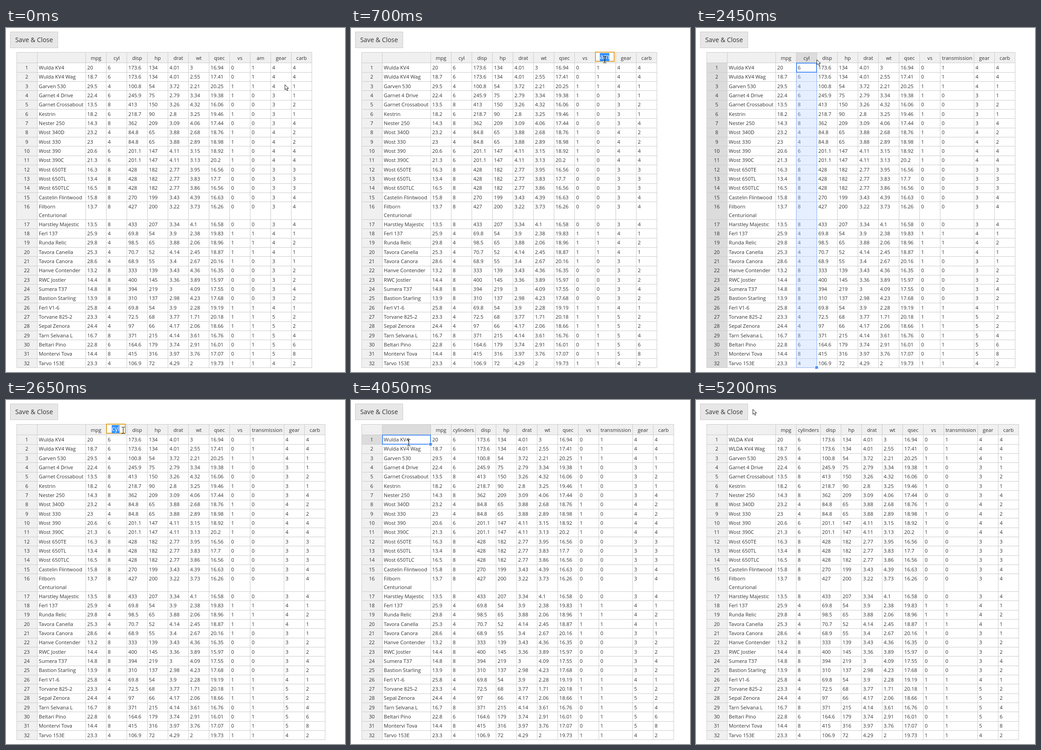
Recreate the animation shown at these times as an HTML page with a canvas. Size 742 by 755 pixels, loop 5.25 s.

```html
<!DOCTYPE html>
<html lang="en">
<head>
<meta charset="utf-8">
<title>Editable table</title>
<style>
html, body { margin: 0; width: 100%; height: 100%; overflow: hidden; background: #fff; }
canvas { display: block; }
</style>
</head>
<body>
<canvas id="stage" width="742" height="755"></canvas>
<script>
const ctx = document.getElementById('stage').getContext('2d');
const LOOP = 5250, STEP = 50;
const FONT = '"Open Sans", "Noto Sans", sans-serif';
const SMALL = '11.12px ' + FONT, LARGE = '13.9px ' + FONT;
const INK = '#333', LINE = '#ccc', HEAD = '#f0f0f0', HEAD_ON = '#dcdcdc', BLUE = '#5292f7';

const heads = ['', 'mpg', 'cyl', 'disp', 'hp', 'drat', 'wt', 'qsec', 'vs', 'am', 'gear', 'carb'];

// Car name, then its cylinders and carburettors
const cars = `Wulda KV4|64
Wulda KV4 Wag|64
Garven 530|41
Garnet 4 Drive|61
Garnet Crossabout|82
Kestrin|61
Nester 250|84
Wost 340D|42
Wost 330|42
Wost 390|64
Wost 390C|64
Wost 650TE|83
Wost 650TL|83
Wost 650TLC|83
Castelin Flintwood|84
Filborn/Centurional|84
Harstley Majestic|84
Ferl 137|41
Runda Relic|42
Tavora Canella|41
Tavora Canora|41
Hanve Contender|82
RWC Jostler|82
Sumera T37|84
Bastion Starling|82
Ferl V1-6|41
Torvane 825-2|42
Sepal Zenora|42
Tarn Selvana L|84
Beltari Pino|66
Montervi Tova|88
Tarvo 153E|42`.split('\n');

// Random source in -1..1, seeded by a word
function noise(word) {
  let seed = 7;
  for (const ch of word) seed = (seed * 31 + ch.charCodeAt(0)) % 233280;
  return () => (seed = (seed * 9301 + 49297) % 233280) / 116640 - 1;
}

const within = (t, a, b) => t >= a && t < b;
const fixed = (value, digits) => +value.toFixed(digits);

function carRow(line, r) {
  const [name, build] = line.split('|');
  const [cyl, carb] = [...build].map(Number);
  const manual = r < 3 || within(r, 17, 20) || r > 24 ? 1 : 0;
  const gear = within(r, 26, 31) ? 5 : manual || within(r, 7, 11) ? 4 : 3;
  const straight = cyl === 4 || cyl === 6 && !manual ? 1 : 0;
  // Models of one make and engine share the engine figures.
  const family = noise(name.split(/[ /]/)[0] + build + manual), own = noise(name);
  const mpg = fixed(38 - 2.9 * cyl + own() * 16 / cyl, 1);
  const disp = fixed(5.6 * cyl * cyl * (1 + 0.25 * family()), cyl > 6 ? 0 : 1);
  const hp = fixed(10 + 10 * cyl + 0.46 * carb * cyl * cyl + 12 * family(), 0);
  const drat = fixed((gear > 3 ? 3.98 : 3.1) + 0.35 * family(), 2);
  const wt = fixed(1.4 + 0.34 * cyl - 0.7 * manual + 0.4 * own(), 2);
  const qsec = fixed((straight ? 19.4 : 16.8) + own(), 2);
  return [name, mpg, cyl, disp, hp, drat, wt, qsec, straight, manual, gear, carb];
}
const rows = cars.map(carRow);

// Top of row r (0-based); the sixteenth row is two lines tall.
const rowTop = r => 76.4 + 20.33 * r + (r > 15 ? 18.4 : 0);
const rowY = r => Math.round(rowTop(r));

// Pointer stops: time, x, y
const path = [
  [0, 610, 124], [350, 570, 26], [650, 555, 69], [1150, 555, 69], [1600, 572, 132],
  [1850, 470, 225], [2200, 283, 75], [2550, 256, 66], [3050, 256, 66], [3350, 430, 222],
  [3400, 218, 247], [3900, 126, 93], [4950, 126, 93], [5050, 226, 195], [5200, 124, 20]
];

function pointer(t) {
  let i = 0;
  while (i < path.length - 2 && path[i + 1][0] <= t) i++;
  const [t0, x0, y0] = path[i], [t1, x1, y1] = path[i + 1];
  const k = Math.min(1, (t - t0) / (t1 - t0));
  return [Math.round(x0 + (x1 - x0) * k), Math.round(y0 + (y1 - y0) * k)];
}

function typed(t, from, to, before, word) {
  if (t < from) return before;
  return word.slice(0, Math.ceil(word.length * Math.min(1, (t - from + STEP) / (to - from))));
}

// The make is retyped in front of the rest of the name.
const retype = (t, from, tail) => typed(t, from, from + 150, 'Wulda', 'WLDA') + tail;

function stateAt(t) {
  const s = { names: [...heads], cells: {}, sel: null, head: null, edit: null };
  if (t >= 1250) s.names[9] = 'transmission';
  if (t >= 3350) s.names[2] = 'cylinders';
  if (t >= 4700) s.cells[0] = 'WLDA KV4';
  if (t >= 5000) s.cells[1] = 'WLDA KV4 Wag';

  if (within(t, 600, 650)) s.sel = { col: 9, all: true };
  if (within(t, 2450, 2550)) s.sel = { col: 2, all: true };
  if (within(t, 3350, 3950)) s.sel = { col: 6, row: 7 };
  if (within(t, 3950, 4200)) s.sel = { col: 0, row: 0 };

  if (within(t, 650, 1250)) s.head = { col: 9, text: typed(t, 750, 1200, 'am', 'transmission'), marked: t < 750 };
  if (within(t, 2550, 3350)) s.head = { col: 2, text: typed(t, 2800, 3100, 'cyl', 'cylinders'), marked: t < 2800 };

  if (within(t, 4200, 4750)) s.edit = { row: 0, text: retype(t, 4450, ' KV4') };
  if (within(t, 4750, 5000)) s.edit = { row: 1, text: retype(t, 4850, ' KV4 Wag') };

  s.beam = within(t, 650, 1250) || within(t, 2550, 3100) || within(t, 3950, 5000);
  return s;
}

function columns(names) {
  const xs = [68, 174];
  for (let c = 1; c < 12; c++) {
    const w = names[c] === 'transmission' ? 74 : names[c] === 'cylinders' ? 53 : 45;
    xs.push(xs[c] + w);
  }
  return xs;
}

function box(x, y, w, h, color) {
  ctx.fillStyle = color;
  ctx.fillRect(x, y, w, h);
}

function label(text, x, y, align = 'left', color = INK, font = SMALL) {
  ctx.font = font;
  ctx.textAlign = align;
  ctx.fillStyle = color;
  ctx.fillText(text, x, y);
}

function frame(l, t, r, b, width, color) {
  ctx.strokeStyle = color;
  ctx.lineWidth = width;
  ctx.strokeRect(l + width / 2, t + width / 2, r - l + 1 - width, b - t + 1 - width);
}

function drawTable(s, xs) {
  const right = xs[12], bottom = rowY(32);
  const active = s.sel || (s.edit && { col: 0, row: s.edit.row });
  box(23, 53, right - 23, 23, HEAD);
  box(23, 76, 45, bottom - 76, HEAD);
  if (active) {
    const top = rowY(active.all ? 0 : active.row);
    box(xs[active.col], 53, xs[active.col + 1] - xs[active.col], 23, HEAD_ON);
    box(23, top, 45, rowY(active.all ? 32 : active.row + 1) - top, HEAD_ON);
  }
  for (const x of [23, ...xs]) box(x, 53, 1, bottom - 52, LINE);
  box(23, 53, right - 22, 1, LINE);
  for (let r = 0; r <= 32; r++) box(23, rowY(r), right - 22, 1, LINE);

  s.names.forEach((name, c) => label(name, (xs[c] + xs[c + 1] + 1) / 2, 70, 'center'));
  rows.forEach((row, r) => {
    const y = Math.round(rowTop(r) + 14.5);
    label(r + 1, 45.5, y, 'center');
    row.forEach((value, c) => {
      const text = String(c === 0 && s.cells[r] || value);
      text.split('/').forEach((part, i) => label(part, xs[c] + 3.8, y + 19 * i));
    });
  });
}

function drawSelection({ col, row, all }, xs) {
  const l = xs[col], r = xs[col + 1];
  const top = rowY(all ? 0 : row), bottom = rowY(all ? 32 : row + 1);
  if (all) {
    box(l, rowY(1), r - l, bottom - rowY(1), 'rgba(181,209,255,.34)');
    frame(l, top, r, bottom, 1, '#89aff9');
  }
  frame(l, top, r, all ? rowY(1) : bottom, 2, BLUE);
  box(r - 4, bottom - 4, 7, 7, '#fff');
  box(r - 3, bottom - 3, 6, 6, BLUE);
}

function drawHeadEditor({ col, text, marked }, xs) {
  const x = xs[col], mid = x + 21;
  box(x, 52, 43, 22, '#fff');
  frame(x, 52, x + 42, 73, 2, '#e2a433');
  ctx.font = LARGE;
  const w = ctx.measureText(text).width;
  const left = w > 35 ? x + 38 - w : mid - w / 2;
  ctx.save();
  ctx.beginPath();
  ctx.rect(x + 3, 54, 37, 19);
  ctx.clip();
  if (marked) box(left, 55, w, 18, '#3390ff');
  else box(Math.round(left + w), 57, 1, 14, '#000');
  label(text, left, 68, 'left', marked ? '#fff' : INK, LARGE);
  ctx.restore();
}

function drawCellEditor({ row, text }, xs) {
  const top = rowY(row), bottom = rowY(row + 1);
  box(xs[0], top, xs[1] - xs[0] + 1, bottom - top + 1, '#fff');
  frame(xs[0], top, xs[1], bottom, 2, BLUE);
  label(text, xs[0] + 4.4, top + 15);
}

function drawBeam(x, y) {
  box(x, y - 6, 1, 13, '#000');
  for (const dy of [-7, 7]) {
    box(x - 3, y + dy, 3, 1, '#000');
    box(x + 1, y + dy, 3, 1, '#000');
  }
}

function drawArrow(x, y) {
  const shape = [[0, 0], [0, 11], [2.5, 8.7], [4.5, 13], [6.5, 12.2], [4.6, 8], [8, 8]];
  ctx.beginPath();
  shape.forEach(([dx, dy]) => ctx.lineTo(x + 0.5 + dx, y + 0.5 + dy));
  ctx.closePath();
  ctx.fillStyle = '#fff';
  ctx.fill();
  ctx.strokeStyle = '#222';
  ctx.lineWidth = 1;
  ctx.stroke();
}

function draw(t) {
  const s = stateAt(t), xs = columns(s.names);
  box(0, 0, 742, 755, '#fff');
  box(9, 8, 105, 36, '#e7e7e7');
  frame(9, 8, 113, 43, 1, LINE);
  label('Save & Close', 61.5, 31, 'center', INK, LARGE);
  drawTable(s, xs);
  if (s.sel) drawSelection(s.sel, xs);
  if (s.head) drawHeadEditor(s.head, xs);
  if (s.edit) drawCellEditor(s.edit, xs);
  (s.beam ? drawBeam : drawArrow)(...pointer(t));
}

const start = performance.now();
function tick() {
  const t = Math.max(0, performance.now() - start) % LOOP;
  draw(Math.floor(t / STEP) * STEP);
  requestAnimationFrame(tick);
}
tick();
</script>
</body>
</html>
```
